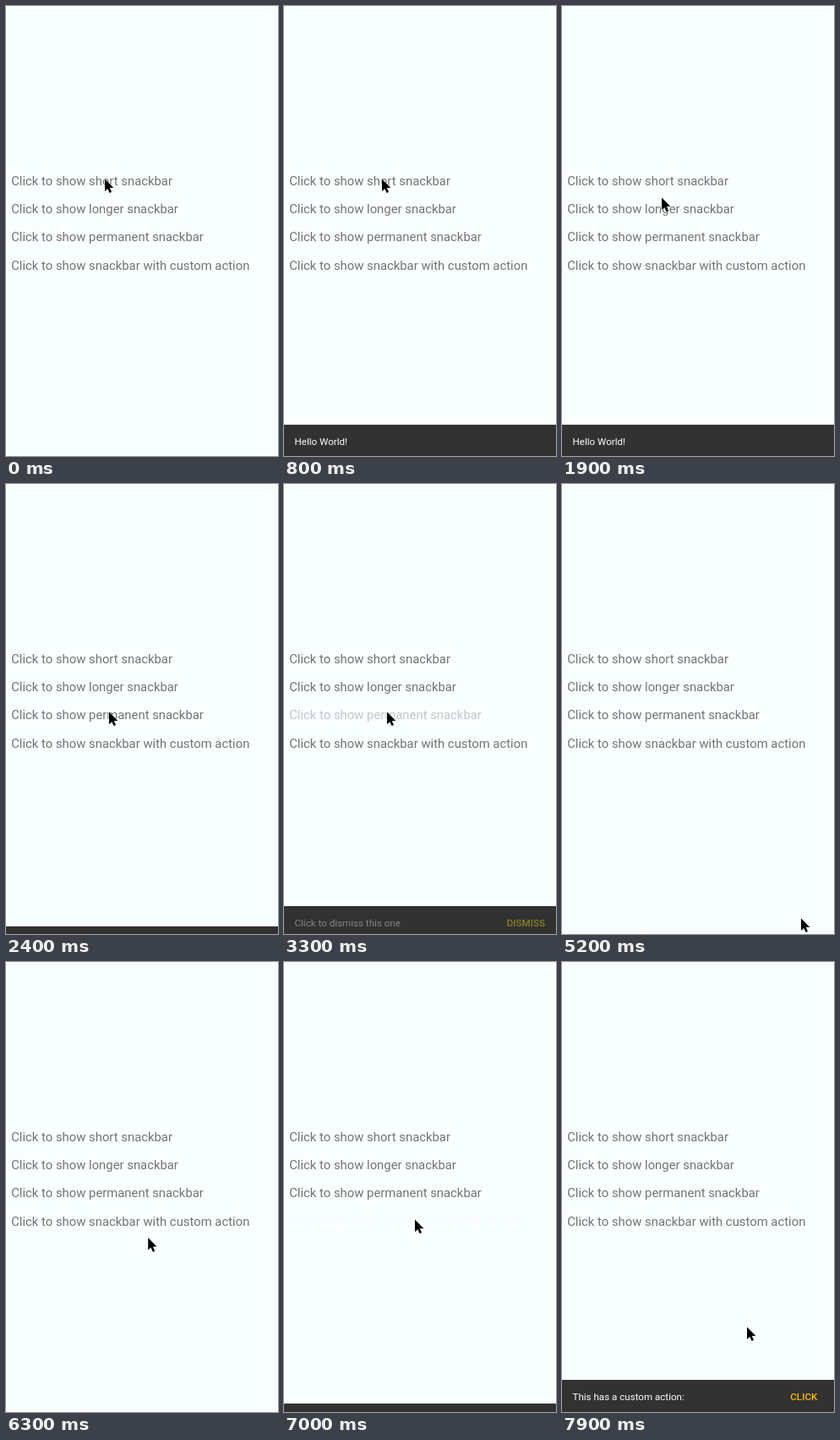
An HTML page that plays this animation: 322 px wide and 532 px high, repeating every 8000 ms.

```html
<!DOCTYPE html>
<html lang="en">
<head>
<meta charset="utf-8">
<style>
  html, body { margin: 0; height: 100%; overflow: hidden; background: #f9feff; }
  svg { display: block; font-family: Roboto, sans-serif; }
  .row { font-size: 14.85px; fill: #717475; }
  .bar { font-size: 11.6px; fill: #fff; }
  #action { font-weight: 500; text-anchor: middle; }
</style>
</head>
<body>
<svg width="322" height="532" viewBox="0 0 322 532">
  <text class="row" x="6.2" y="212.3">Click to show short snackbar</text>
  <text class="row" x="6.2" y="245.3">Click to show longer snackbar</text>
  <text class="row" x="6.2" y="278.3">Click to show permanent snackbar</text>
  <text class="row" x="6.2" y="311.5">Click to show snackbar with custom action</text>
  <g class="bar" id="bar">
    <rect width="322" height="40" fill="#323232"/>
    <g id="label">
      <text id="message" x="12.5" y="24.2"></text>
      <text id="action" x="286.3" y="24.2"></text>
    </g>
  </g>
  <path id="cursor" d="M0 0V14.5L3.3 11.4 5.6 16.6 8 15.6 5.8 10.5H10.3Z" stroke="#fff" paint-order="stroke"/>
</svg>
<script>
const LOOP = 8000, STEP = 100, FADE_OUT = 150, FADE_IN = 250, ENTER = 225;
const $ = id => document.getElementById(id);
const rows = document.querySelectorAll('.row');

const snackbars = [
  { row: 0, press: 120, show: 400, hide: 2149, exit: 490, height: 37, message: 'Hello World!', action: '' },
  { row: 2, press: 2980, show: 3188, hide: 5000, exit: 200, height: 38, message: 'Click to dismiss this one', action: 'DISMISS', color: '#ffee10' },
  { row: 3, press: 6640, show: 6978, hide: LOOP, exit: 200, height: 38, message: 'This has a custom action:', action: 'CLICK', color: '#fdb90b' },
];

// Cursor stops: time, x, y
const stops = [
  [0, 117, 204.5], [100, 116, 204.5], [1620, 116, 204.5], [2300, 122, 269.5],
  [3620, 122, 269.5], [4500, 282, 507], [4700, 282, 511], [4800, 282, 511],
  [4900, 283, 513.5], [5620, 283, 513.5], [6500, 155, 304.5],
  [7620, 155, 304.5], [7900, 219, 431.5], [LOOP, 219, 431.5],
];

const progress = (t, start, duration) => Math.min(1, Math.max(0, (t - start) / duration));
const inOut = p => p < .5 ? 2 * p * p : 1 - 2 * (1 - p) ** 2;
const easeOut = (p, power) => 1 - (1 - p) ** power;

function drawCursor(t) {
  const i = stops.findIndex(stop => stop[0] > t);
  const [t0, x0, y0] = stops[i - 1], [t1, x1, y1] = stops[i];
  const p = inOut(progress(t, t0, t1 - t0));
  $('cursor').setAttribute('transform', `translate(${x0 + (x1 - x0) * p} ${y0 + (y1 - y0) * p})`);
}

function drawSnackbar(t) {
  const s = snackbars.findLast(s => t >= s.press) || snackbars[0];
  const enter = progress(t, s.show, ENTER), leave = easeOut(progress(t, s.hide, s.exit), 2);
  const visible = Math.round(s.height * easeOut(enter, 3) * (1 - leave));
  $('bar').setAttribute('transform', `translate(0 ${532 - visible})`);
  $('label').setAttribute('opacity', enter ** 1.3 * (1 - leave));
  $('message').textContent = s.message;
  $('action').textContent = s.action;
  $('action').setAttribute('fill', s.color || '#fff');
}

function drawRows(t) {
  for (const s of snackbars) {
    const opacity = t < s.show
      ? 1 - inOut(progress(t, s.press, FADE_OUT))
      : inOut(progress(t, s.show, FADE_IN));
    rows[s.row].setAttribute('opacity', opacity);
  }
}

function draw(now) {
  const t = Math.floor(now % LOOP / STEP) * STEP;
  drawRows(t);
  drawSnackbar(t);
  drawCursor(t);
}

const start = performance.now();
function tick() {
  draw(performance.now() - start);
  requestAnimationFrame(tick);
}
tick();
</script>
</body>
</html>
```
